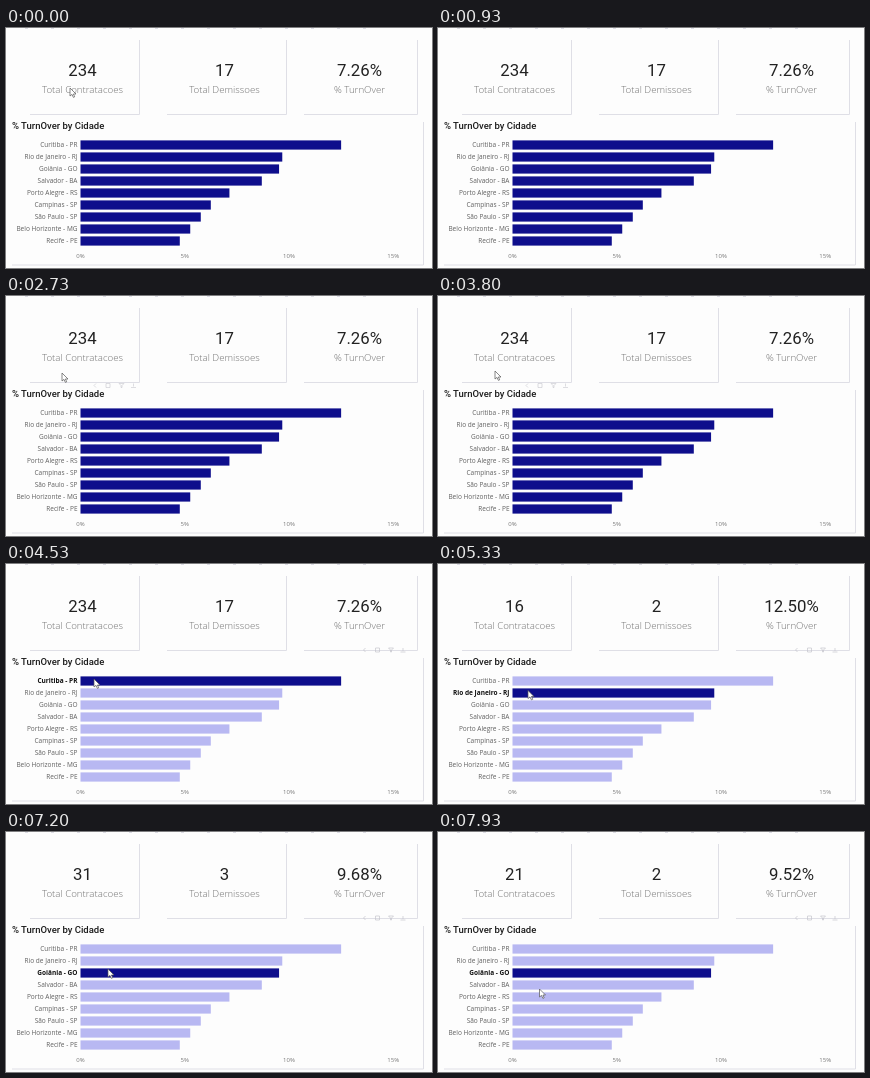
Recreate the animation shown at these times as an HTML page. Size 426 by 240 pixels, loop 8000 ms.

```html
<!DOCTYPE html>
<html lang="pt">
<head>
<meta charset="utf-8">
<title>TurnOver</title>
<style>
  html, body { margin: 0; width: 100%; height: 100%; overflow: hidden; background: #fdfdfd; }
  svg { display: block; width: 100%; height: 100%; font-family: "Open Sans", sans-serif; }
  .value { font: 400 16.8px Roboto, sans-serif; fill: #222; text-anchor: middle; }
  .label { font-size: 9.7px; font-weight: 300; fill: #707070; text-anchor: middle; }
  .title { font: 500 9.5px Roboto, sans-serif; fill: #1c1c1c; }
  .city { font-size: 6.5px; fill: #606060; text-anchor: end; }
  .city.on { font-weight: 700; fill: #111; }
  .tick { font-size: 6px; fill: #777; text-anchor: middle; }
  .edge { fill: none; stroke: #dfdfe6; }
  .icons { fill: none; stroke: #c4c4cc; stroke-width: .7; }
</style>
</head>
<body>
<svg id="stage" viewBox="0 0 426 240"></svg>
<script>
const LOOP = 8000, TRAVEL = 550, REFRESH = 240;
const DARK = '#0e0e8c', LIGHT = '#b8b8f2';
const LEFT = 74.5, PER_CENT = 20.85, ROW = 12;
const TOTAL = { exits: 17, hires: 234 };
const stage = document.getElementById('stage');

function add(tag, attrs, text = '') {
  const node = document.createElementNS('http://www.w3.org/2000/svg', tag);
  for (const key in attrs) node.setAttribute(key, attrs[key]);
  node.textContent = text;
  return stage.appendChild(node);
}
const turnover = ({ exits, hires }) => 100 * exits / hires;

add('rect', { width: 426, height: 240, fill: '#fdfdfd' });

// Descenders of the heading cut off by the top edge
for (let x = 19; x < 370; x += 26)
  add('rect', { x, y: 0, width: 3, height: .8, fill: '#d6d6e0' });

const cards = [
  { x: 76.5, left: 24, right: 133.5, label: 'Total Contratacoes', read: row => row.hires },
  { x: 218.5, left: 161, right: 280.5, label: 'Total Demissoes', read: row => row.exits },
  { x: 353.5, left: 298, right: 411.5, label: '% TurnOver', read: row => turnover(row).toFixed(2) + '%' }
];
for (const card of cards) {
  add('path', { class: 'edge', d: `M${card.right} 12V86.5H${card.left}` });
  card.value = add('text', { class: 'value', x: card.x, y: 48.2 });
  add('text', { class: 'label', x: card.x, y: 65 }, card.label);
}

add('path', { class: 'edge', d: 'M417.5 94V237H6' });
add('text', { class: 'title', x: 6, y: 100.5 }, '% TurnOver by Cidade');

const rows = [
  ['Curitiba - PR', 2, 16], ['Rio de Janeiro - RJ', 3, 31], ['Goiânia - GO', 2, 21],
  ['Salvador - BA', 2, 23], ['Porto Alegre - RS', 1, 14], ['Campinas - SP', 2, 32],
  ['São Paulo - SP', 3, 52], ['Belo Horizonte - MG', 1, 19], ['Recife - PE', 1, 21]
].map(([city, exits, hires], i) => ({
  exits, hires,
  name: add('text', { class: 'city', x: 71.5, y: 119.2 + i * ROW }, city),
  bar: add('rect', {
    x: LEFT, y: 112.4 + i * ROW, height: 9.2,
    width: turnover({ exits, hires }) * PER_CENT
  })
}));

for (let percent = 0; percent <= 15; percent += 5)
  add('text', { class: 'tick', x: LEFT + percent * PER_CENT, y: 230 }, percent + '%');

// Buttons shown beside a hovered visual
const header = (x, y) => add('path', {
  class: 'icons', transform: `translate(${x} ${y})`,
  d: 'M0 -2l-2 2 2 2M10 -2h4v4h-4zM23 -2h5l-2 2v2h-1v-2zM35 2h5M37.5 -2v3'
});
const cardHeader = header(90, 89.5);
const chartHeader = header(359.5, 86);

const cursor = add('path', {
  d: 'M0 0V8L2 6.4 3.4 9.4 4.7 8.8 3.4 6H6Z',
  fill: '#fff', stroke: '#555', 'stroke-width': .7, 'stroke-linejoin': 'round'
});

// Pointer stops: arrival time, place and the row clicked there
const stops = [
  { at: 0, x: 64, y: 60 },
  { at: 700, x: 50, y: -14 },
  { at: 2600, x: 56, y: 77 },
  { at: 3700, x: 57, y: 75 },
  { at: 4400, x: 88, y: 115, pick: rows[0] },
  { at: 5230, x: 90, y: 126.5, pick: rows[1] },
  { at: 6400, x: 102, y: 136.5 },
  { at: 7000, x: 102, y: 137, pick: rows[2] },
  { at: 7750, x: 101.5, y: 157 }
];
const picked = t => stops.findLast(stop => stop.pick && stop.at <= t)?.pick;

function position(t) {
  let { x, y } = stops[0];
  for (const stop of stops.slice(1)) {
    const p = Math.min(1, Math.max(0, 1 + (t - stop.at) / TRAVEL));
    const ease = p * p * (3 - 2 * p);
    x += (stop.x - x) * ease;
    y += (stop.y - y) * ease;
  }
  return { x, y };
}

function draw() {
  const t = performance.now() % LOOP;
  const selected = picked(t);
  const shown = picked(t - REFRESH) ?? TOTAL;
  for (const card of cards) card.value.textContent = card.read(shown);
  for (const row of rows) {
    row.name.classList.toggle('on', row === selected);
    row.bar.setAttribute('fill', !selected || row === selected ? DARK : LIGHT);
  }
  const { x, y } = position(t);
  cursor.setAttribute('transform', `translate(${x} ${y})`);
  cardHeader.setAttribute('opacity', t > 2500 && y < 90 ? .8 : 0);
  chartHeader.setAttribute('opacity', y > 92 ? 1 : 0);
  requestAnimationFrame(draw);
}
draw();
</script>
</body>
</html>
```
